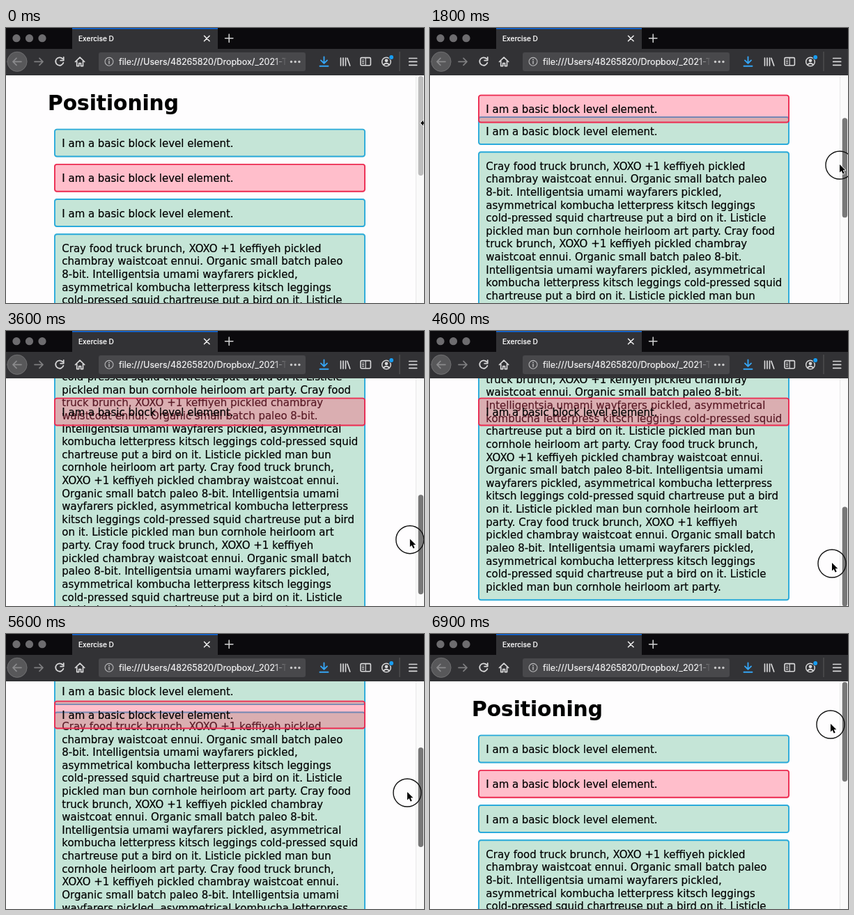
Recreate the animation shown at these times as an HTML page with a canvas. Size 600 by 395 pixels, loop 7000 ms.

```html
<!DOCTYPE html>
<html lang="en">
<head>
<meta charset="utf-8">
<title>Exercise D</title>
<style>
  html, body { margin: 0; width: 100%; height: 100%; overflow: hidden; background: #fefdfe; }
  canvas { display: block; width: 600px; height: 395px; }
</style>
</head>
<body>
<canvas id="stage"></canvas>
<script>
const W = 600, H = 395, LOOP = 7000, STEP = 100;
const canvas = document.getElementById('stage');
const ratio = window.devicePixelRatio || 1;
canvas.width = W * ratio;
canvas.height = H * ratio;
const ctx = canvas.getContext('2d');
ctx.scale(ratio, ratio);

const PAGE_TOP = 68, FIRST_BOX = 144.7, PITCH = 50.2, LINE = 18.62;
const STICKY_TOP = 95.7, BOX_X = 69, BOX_W = 447, BOX_H = 40.8;
const GREEN = '#c5e5d7', BLUE = '#2aaadb', RED = '#ec2d52', PINK = 'rgba(255,72,106,.35)';
const BODY_FONT = '14.96px "DejaVu Sans", sans-serif';
const LABEL = 'I am a basic block level element.';
const LINES = `Cray food truck brunch, XOXO +1 keffiyeh pickled
chambray waistcoat ennui. Organic small batch paleo
8-bit. Intelligentsia umami wayfarers pickled,
asymmetrical kombucha letterpress kitsch leggings
cold-pressed squid chartreuse put a bird on it. Listicle
pickled man bun cornhole heirloom art party. Cray food
truck brunch, XOXO +1 keffiyeh pickled chambray
waistcoat ennui. Organic small batch paleo 8-bit.
Intelligentsia umami wayfarers pickled, asymmetrical
kombucha letterpress kitsch leggings cold-pressed squid
chartreuse put a bird on it. Listicle pickled man bun
cornhole heirloom art party. Cray food truck brunch,
XOXO +1 keffiyeh pickled chambray waistcoat ennui.
Organic small batch paleo 8-bit. Intelligentsia umami
wayfarers pickled, asymmetrical kombucha letterpress
kitsch leggings cold-pressed squid chartreuse put a bird
on it. Listicle pickled man bun cornhole heirloom art
party. Cray food truck brunch, XOXO +1 keffiyeh
pickled chambray waistcoat ennui. Organic small batch
paleo 8-bit. Intelligentsia umami wayfarers pickled,
asymmetrical kombucha letterpress kitsch leggings
cold-pressed squid chartreuse put a bird on it. Listicle
pickled man bun cornhole heirloom art party.`.split('\n');

// Monotone cubic curve through [time, value] points.
function curve(points) {
  const last = points.length - 1;
  const slope = i => (points[i + 1][1] - points[i][1]) / (points[i + 1][0] - points[i][0]);
  const tangent = i => {
    if (i === 0 || i === last) return 0;
    const a = slope(i - 1), b = slope(i);
    return a * b <= 0 ? 0 : 2 * a * b / (a + b);
  };
  return t => {
    if (t <= points[0][0]) return points[0][1];
    if (t >= points[last][0]) return points[last][1];
    const i = points.findIndex(p => p[0] > t) - 1;
    const [t0, v0] = points[i], [t1, v1] = points[i + 1];
    const d = t1 - t0, u = (t - t0) / d, w = 1 - u;
    return v0 * (1 + 2 * u) * w * w + v1 * u * u * (3 - 2 * u)
      + d * u * w * (tangent(i) * w - tangent(i + 1) * u);
  };
}

const scrollAt = curve([[550, 0], [1100, 47.5], [1800, 118], [2900, 209.3],
  [3980, 358.6], [4820, 358.6], [5600, 183.8], [6580, 0]]);
const pointerX = curve([[0, 598], [500, 594], [1100, 592], [1800, 588], [2900, 582.6],
  [4600, 577], [5600, 576], [6900, 575]]);
const pointerY = curve([[0, 136], [500, 139], [1100, 166], [1800, 197], [2900, 243.4],
  [3950, 322], [4400, 334], [4600, 334], [5600, 228], [6550, 134], [6900, 130]]);

function fill(x, y, w, h, color, r = 0) {
  ctx.fillStyle = color;
  ctx.beginPath();
  ctx.roundRect(x, y, w, h, r);
  ctx.fill();
}

function disc(x, y, r, color) {
  ctx.fillStyle = color;
  ctx.beginPath();
  ctx.arc(x, y, r, 0, 2 * Math.PI);
  ctx.fill();
}

function stroke(path, color, width = 1.6) {
  ctx.strokeStyle = color;
  ctx.lineWidth = width;
  ctx.lineCap = ctx.lineJoin = 'round';
  ctx.stroke(new Path2D(path));
}

function ring(x, y, r, color, width) {
  stroke(`M${x - r} ${y}a${r} ${r} 0 1 1 ${2 * r} 0a${r} ${r} 0 1 1 ${-2 * r} 0`, color, width);
}

// The thin outline gives the slightly heavy look of smoothed screen text.
function write(text, x, y, font, color, weight = 0.2) {
  ctx.font = font;
  ctx.fillStyle = ctx.strokeStyle = color;
  ctx.lineWidth = weight;
  ctx.lineJoin = 'round';
  ctx.fillText(text, x, y);
  ctx.strokeText(text, x, y);
}

function box(y, lines, background, border) {
  const h = BOX_H + (lines.length - 1) * LINE;
  fill(BOX_X, y, BOX_W, h, background, 4);
  ctx.strokeStyle = border;
  ctx.lineWidth = 1.9;
  ctx.beginPath();
  ctx.roundRect(BOX_X + 0.95, y + 0.95, BOX_W - 1.9, h - 1.9, 3.2);
  ctx.stroke();
  lines.forEach((line, i) => write(line, 80.3, y + 26.4 + i * LINE, BODY_FONT, '#000'));
}

function page(scroll, active) {
  fill(0, PAGE_TOP, W, H - PAGE_TOP, '#fefdfe');
  ctx.save();
  ctx.beginPath();
  ctx.rect(0, PAGE_TOP, W, H - PAGE_TOP);
  ctx.clip();
  write('Positioning', 60, 118 - scroll, 'bold 29.6px "DejaVu Sans", sans-serif', '#000');
  const top = i => FIRST_BOX + i * PITCH - scroll;
  box(top(0), [LABEL], GREEN, BLUE);
  box(top(2), [LABEL], GREEN, BLUE);
  box(top(3), LINES, GREEN, BLUE);
  box(Math.max(top(1), STICKY_TOP), [LABEL], PINK, RED);
  fill(588, PAGE_TOP, 12, H, '#fafafa');
  fill(588, PAGE_TOP, 1, H, '#e8e8e8');
  fill(591.7, 69 + scroll / 1.955, 7.4, 143, active ? '#777' : '#bdbdbd', 3.7);
  ctx.restore();
}

function tabBar() {
  fill(0, 0, W, 30, '#0b0a0d');
  [15, 33.5, 52].forEach(x => disc(x, 14.7, 5.6, '#6d6c6f'));
  fill(95, 0, 209, 30, '#323235');
  fill(95, 0, 209, 1.6, '#0a68e2');
  write('Exercise D', 104, 19, '500 10.1px Inter, sans-serif', '#f8f8f8');
  stroke('M284.5 11.2l7.6 7.6m0-7.6l-7.6 7.6', '#f4f4f4', 1.5);
  stroke('M314.5 14.7h11.4m-5.7-5.7v11.4', '#d4d4d5', 1.5);
}

function toolbar() {
  const light = '#d8d8d9', dim = '#7e7e80';
  fill(0, 30, W, 38, '#323235');
  disc(16, 48.3, 14.3, '#58585a');
  ring(16, 48.3, 14, '#6d6d6f', 1);
  stroke('M22 48.3h-12m5-5l-5 5l5 5', '#8a8a8c', 1.7);
  stroke('M41 48.3h12m-5-5l5 5l-5 5', dim, 1.7);
  stroke('M81.2 44.2a5.7 5.7 0 1 0 1.2 5.6M82.7 42v4.6h-4.6', light, 1.8);
  stroke('M99.5 48.5l6.6-6.3l6.6 6.3M101.7 47.6v7h3v-4h2.8v4h3v-7', light, 1.7);

  fill(133, 35, 297, 27, '#48484b', 3);
  ring(148, 48.3, 5.9, '#b7b7b9', 1.1);
  stroke('M148 47.7v3.5', '#c9c9ca', 1.3);
  disc(148, 45.3, 0.9, '#c9c9ca');
  const fade = ctx.createLinearGradient(382, 0, 403, 0);
  fade.addColorStop(0, '#f4f4f5');
  fade.addColorStop(1, '#48484b');
  write('file:///Users/48265820/Dropbox/_2021-T', 162, 53, '12.5px Inter, sans-serif', fade);
  fill(403, 37, 25, 23, '#48484b');
  [409.5, 415.2, 420.9].forEach(x => disc(x, 48.5, 1.7, '#c9c9ca'));

  stroke('M456.5 41.5v9.3m-4.5-4.4l4.5 4.5l4.5-4.5M450.5 54.7h12', '#35a5f5', 1.9);
  stroke('M480.5 43v11m3.5-11v11m3.5-11v11m2.4-10.7l3.8 10.7', light, 1.7);
  stroke('M510.5 42.6h11.4q1.5 0 1.5 1.5v8.2q0 1.5-1.5 1.5h-11.4q-1.5 0-1.5-1.5v-8.2q0-1.5 1.5-1.5z', light, 1.6);
  stroke('M516.2 43v10.5m-4.7-7.5h2m-2 2.4h2m-2 2.4h2', light, 1.2);
  ring(546, 48.5, 6.3, light, 1.5);
  disc(546, 46.8, 2.4, light);
  stroke('M542.4 52.3q3.6-3.2 7.2 0', light, 2);
  disc(553.2, 42, 3.8, '#323235');
  disc(553.2, 42, 2.9, '#189df2');
  fill(564.5, 34, 1, 28, '#58585a');
  stroke('M578.7 43.5h11m-11 4.9h11m-11 4.9h11', light, 1.7);
}

function outlined(path) {
  const shape = new Path2D(path);
  ctx.lineJoin = 'round';
  ctx.lineWidth = 1.6;
  ctx.strokeStyle = '#fff';
  ctx.stroke(shape);
  ctx.fillStyle = '#000';
  ctx.fill(shape);
}

function draw(t) {
  const x = pointerX(t), y = pointerY(t);
  page(scrollAt(t), t >= 300);
  tabBar();
  toolbar();
  if (t < 200) {
    outlined(`M${x - 3} ${y + 0.5}l4-4v3h4v2h-4v3z`);
    return;
  }
  if (t >= 500) ring(x, y, 20, '#111', 1.4);
  outlined(`M${x} ${y - 1}v11.4l2.6-2.4l2.1 4.6l2-.9l-2-4.5h3.6z`);
}

const start = performance.now();
function tick() {
  const t = (performance.now() - start) % LOOP;
  draw(Math.floor(t / STEP) * STEP);
  requestAnimationFrame(tick);
}
tick();
</script>
</body>
</html>
```
